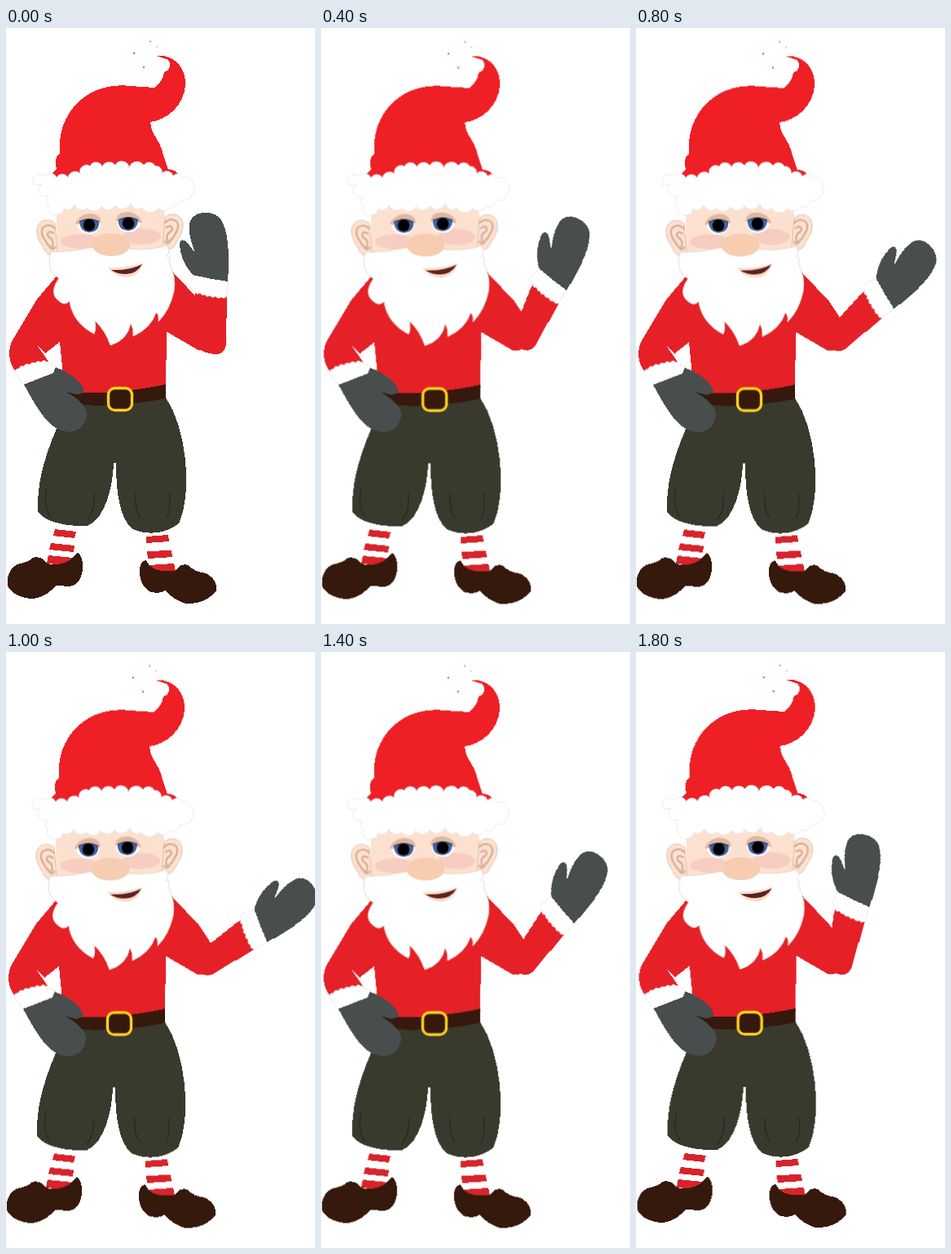
Recreate the animation shown at these times as an HTML page without scripts. Size 379 by 729 pixels, loop 2000 ms.

```html
<!DOCTYPE html>
<html lang="en">
<head>
<meta charset="utf-8">
<title>Waving Santa</title>
<style>
  html, body { margin: 0; width: 100%; height: 100%; overflow: hidden; background: #fff; }
  svg { display: block; width: 379px; height: 729px; }

  .body { animation: sway 2s step-end infinite; }
  .forearm {
    transform-box: view-box;
    transform-origin: 257px 373px;
    animation: wave 2s step-end infinite;
  }
  @keyframes wave {
    0%, 100% { transform: none; }
    10%, 90% { transform: translate(-1px, -4px) rotate(15deg); }
    20%, 80% { transform: translate(2px, -4px) rotate(28deg); }
    30%, 70% { transform: translate(3px, -2px) rotate(39deg); }
    40%, 60% { transform: translate(3px, 0) rotate(49deg); }
    50% { transform: translate(3px, 2px) rotate(58deg); }
  }
  @keyframes sway {
    0%, 100% { transform: none; }
    10%, 90% { transform: translate(-.4px, 0); }
    20%, 80% { transform: translate(-.6px, .5px); }
    30%, 70% { transform: translate(-.8px, .5px); }
    40%, 60% { transform: translate(-1px, .5px); }
    50% { transform: translate(-1px, .5px); }
  }

  .hat, .coat, .mitten, .leather, .pants, .stripe { shape-rendering: crispEdges; }
  .hat { fill: #ef1f26; }
  .coat { fill: #e62027; }
  .mitten { fill: #474e4d; }
  .leather { fill: #36190d; }
  .pants { fill: #39392d; }
  .crease { fill: none; stroke: #26261d; stroke-width: 1.2; }
  .stripe { fill: #d9232a; }
  .fur { fill: #fff; stroke: #e6e6e6; stroke-width: .8; stroke-linejoin: round; }
  .beard { fill: #fff; stroke: #ead9c8; stroke-width: 1; }
  .skin { fill: #fde1d0; }
  .ear { fill: #fde1d0; stroke: #dfc0ab; stroke-width: 1; }
  .fold { fill: none; stroke: #d9b39c; stroke-width: 2.6; stroke-linecap: round; }
  .cheek { fill: #f8cdc1; }
  .lid { fill: #deb8a2; }
  .iris { fill: #4562a2; }
</style>
</head>
<body>
<svg viewBox="0 0 379 729">
  <defs>
    <g id="ear">
      <path class="ear" d="M8 -17C0 -25 -14 -21 -14 -8C-14 3 -8 8 -5 15C-2 23 7 23 11 18Z"/>
      <path class="fold" d="M8 -11C1 -18 -9 -14 -8 -6C-8 0 -3 4 -1 9M6 -5C0 -9 -3 -4 1 0C7 3 6 9 4 13M0 9Q5 18 8 12"/>
    </g>
    <g id="eye">
      <path class="lid" d="M-17 -1Q-14 -12 0 -14Q14 -14 15 -3Z"/>
      <path fill="#fff" d="M-15 1Q-8 -6 0 -6Q8 -6 14 0Q10 11 0 11Q-10 11 -15 1Z"/>
      <path class="iris" d="M-12 -4Q0 -12 12 -4Q13 8 0 9Q-11 8 -12 -4Z"/>
      <path d="M-12 -4Q0 -10 12 -4" fill="none" stroke="#34466f" stroke-width="1.5"/>
      <circle r="7.3"/>
    </g>
  </defs>

  <g class="body">
    <!-- legs and shoes -->
    <path class="stripe" d="M60 613L86 616L84 624L58 621ZM55 630L84 633L83 641L53 638ZM52 645L82 648L78 657L50 655Z"/>
    <path class="stripe" d="M172 622L199 620L200 628L172 630ZM173 640L203 639L204 647L174 649ZM175 657L206 655L208 664L177 665Z"/>
    <path class="leather" d="M2 682Q0 664 14 656Q26 654 33 648Q43 645 50 655Q75 660 88 641Q97 650 93 668Q88 685 72 683Q66 680 60 683Q47 698 30 698Q8 695 2 682Z"/>
    <path class="leather" d="M164 665Q164 652 172 651Q178 667 208 664Q214 654 223 657Q231 665 245 667Q259 674 258 688Q245 705 220 704Q205 699 195 688Q190 692 178 690Q164 683 164 665Z"/>

    <path class="pants" d="M85 459L62 490C45 530 38 560 39 592Q55 610 100 609C122 600 131 560 132 533Q133 530 135 533C135 570 140 600 155 613Q187 625 212 606C229 570 222 490 196 452Z"/>
    <path class="crease" d="M50 563Q45 585 55 598M108 569Q110 590 100 601M159 569Q157 588 165 599M200 569Q203 588 197 599"/>

    <!-- coat and arms -->
    <path class="coat" d="M64 301L38 332L8 382Q0 398 8 414L12 421L52 408L37 386L48 398L66 384L72 445L140 450L195.500 440L197.500 372L206 300Z"/>
    <path class="coat" d="M196 290L206 300L238 334L250 352L257 373Q252 397 236 394L198 372Z"/>
    <g class="forearm">
      <path class="coat" d="M232 318L271 325L270 386Q269 399 257 399Q244 398 233 391L236 365L232 330Z"/>
      <path class="fur" d="M230 301L272 310L271 328q-3 4 -7 1q-4 3 -7 -1q-4 3 -7 -1q-4 3 -6 -1q-4 2 -6 -2q-5 3 -6 -2q-5 0 -6 -6Z"/>
      <path class="mitten" d="M229 302C217 288 213 275 213 263Q215 257 221 261L232 275Q222 250 226 236Q231 226 243 226Q257 225 264 235Q276 254 272 310Q250 307 229 302Z"/>
    </g>

    <path class="leather" d="M72 444Q120 451 196 436L196 453Q145 464 92 461Z"/>
    <rect x="125.500" y="440.500" width="29" height="27" rx="8" fill="#36190d" stroke="#fbd01c" stroke-width="3.400"/>
    <path class="fur" d="M11 421q1 -5 5 -4q1 -5 6 -3q2 -5 7 -2q2 -4 7 -2q2 -4 7 -1q3 -4 6 -1L61 414L60 424L22 437Z"/>
    <path class="mitten" d="M22 436L58 422L61 415C86 425 94 437 96 443Q93 452 72 444Q100 459 99 474Q95 494 76 494C54 491 44 476 22 436Z"/>

    <!-- head -->
    <path class="hat" d="M53 181L62 172Q58 160 66 153C62 101 103 65 152 71L182 73Q192 66 194 54C201 53 203 44 199 39Q192 36 184 34C206 32 221 48 220 70C218 95 198 112 177 115C178 130 188 136 192 152L199 173Q210 173 214 184L130 200Z"/>
    <g fill="#f0653a">
      <circle cx="157" cy="31" r="1.200"/><circle cx="177" cy="16.500" r=".9"/>
      <circle cx="169" cy="48" r="1.200"/><circle cx="185" cy="23" r=".7"/>
    </g>
    <path class="skin" d="M62 205H192L200 272Q130 300 62 274Z"/>
    <use href="#ear" x="52" y="256"/>
    <use href="#ear" transform="translate(203 249) scale(-1 1)"/>
    <ellipse class="cheek" cx="91" cy="261" rx="24" ry="9"/>
    <ellipse class="cheek" cx="167" cy="255" rx="23" ry="10"/>
    <use href="#eye" x="102" y="241"/>
    <use href="#eye" transform="translate(150 239) scale(-1 1)"/>

    <path class="beard" d="M55 274Q80 274 107 268Q129 282 151 270Q175 273 197 266Q203 273 197 279Q203 279 200 287Q209 304 206 322Q201 345 187 359Q188 350 184 348Q178 367 156 377Q157 368 153 361Q149 382 128 388Q122 370 109 358Q111 368 108 374C90 365 80 350 78 334Q73 339 68 336C56 329 56 319 65 306C53 299 51 290 55 274Z"/>
    <ellipse cx="129" cy="265" rx="23.500" ry="14" fill="#f6cdb1"/>
    <path fill="#fbdac8" d="M125 293Q150 294 168 287Q164 304 147 305Q133 304 125 293Z"/>
    <path fill="#5c2123" d="M129 296Q151 297 167 289Q160 301 147 301Q136 301 129 296Z"/>

    <path class="fur" d="M34 192a9 9 0 0 1 14 -11a8 8 0 0 1 14 2a8 8 0 0 1 14 0a9 9 0 0 1 15 -5a8 8 0 0 1 12 -9a8 8 0 0 1 15 1a9 9 0 0 1 16 -2a9 9 0 0 1 17 3a10 10 0 0 1 18 -3a8 8 0 0 1 14 1a7 7 0 0 1 8 9a8 8 0 0 1 14 3a7 7 0 0 1 12 2a10 10 0 0 1 13 10a9 9 0 0 1 -3 13a9 9 0 0 1 -12 4a9 9 0 0 1 -12 8a10 10 0 0 1 -16 2a12 12 0 0 1 -20 0a9 9 0 0 1 -14 -6a11 11 0 0 1 -19 3a10 10 0 0 1 -17 1a10 10 0 0 1 -17 2a10 10 0 0 1 -16 -4a9 9 0 0 1 -13 5a8 8 0 0 1 -10 7a8 8 0 0 1 -9 -11a9 9 0 0 1 0 -12a8 8 0 0 1 -8 -14Z"/>
  </g>
</svg>
</body>
</html>
```
